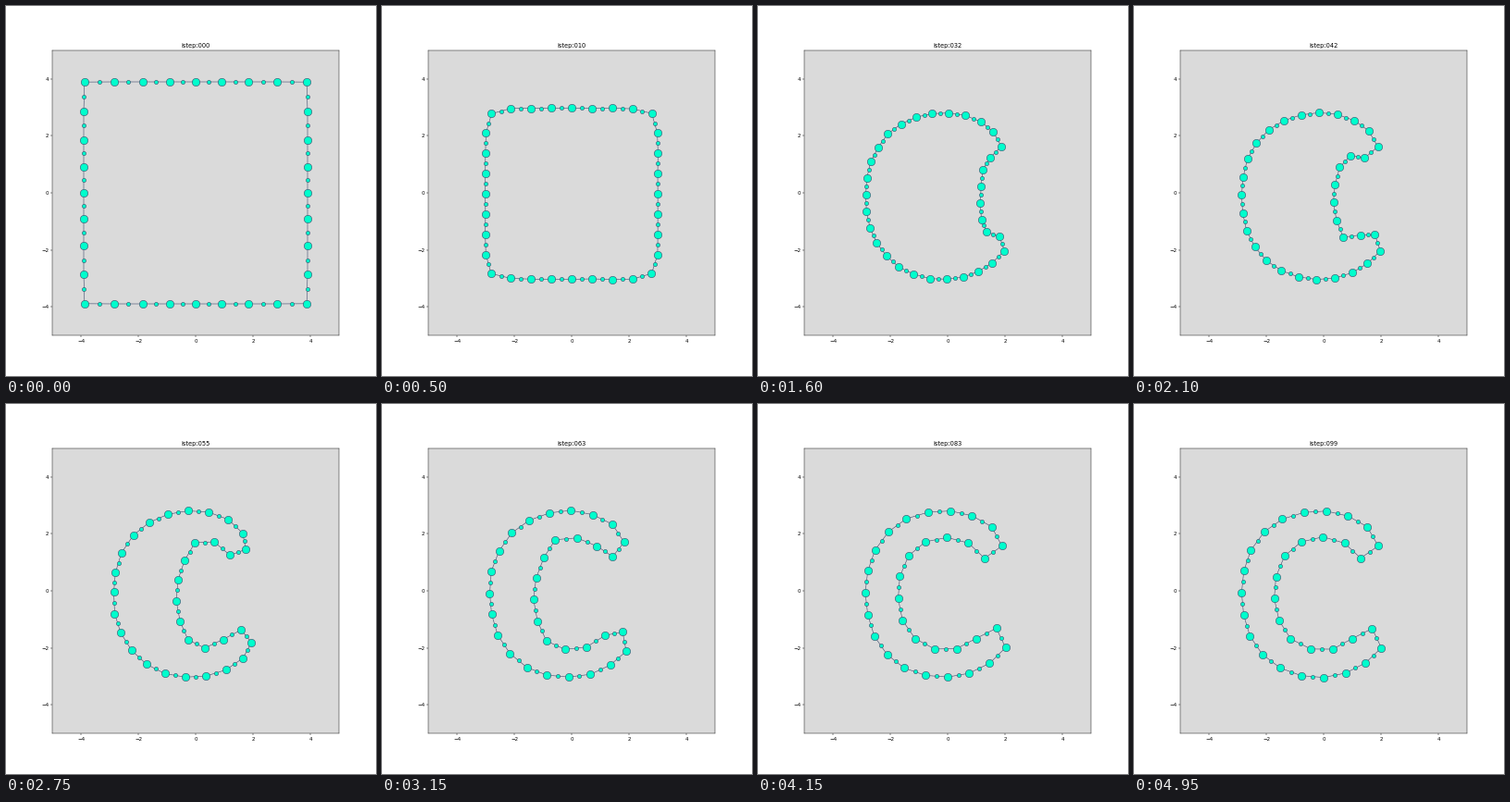
A matplotlib script that plays this animation: 400x400 px, repeating every 5 s.

```python
import numpy as np
import matplotlib.pyplot as plt
from matplotlib.animation import FuncAnimation

FRAMES, INTERVAL = 100, 50
NODES = 32
MEET = 22          # step at which the square has settled on the outer arc
FILL, INK = "#00ffcc", "#3a4468"


def bow(cx, cy, rx, ry, start, end):
    """Arc with a slightly squarer left half; angle 0 is left, pi/2 is up."""
    phi = np.linspace(start, end, 240)
    c, s = np.cos(phi), np.sin(phi)
    e = np.where(c > 0, 2 / 2.2, 1)
    return np.column_stack([cx - rx * np.sign(c) * np.abs(c) ** e,
                            cy - ry * np.sign(s) * np.abs(s) ** e])


# The C, laid out in stage pixels with y pointing down.
OUTER = (202, 205.5, 85.7, 90)
ANCHOR = 0.01
UPPER = np.vstack([bow(*OUTER, ANCHOR, 2.2), (264, 153.5)])
LOWER = np.vstack([(267.5, 263.5), bow(*OUTER, -2.32, ANCHOR)])
INNER = np.vstack([bow(204, 205, 52.5, 61, 2.48, -2.26), (258, 242)])
BARRIER = np.vstack([LOWER, UPPER])


def shrinking_square(t):
    """A square closing in at constant speed until the outer arc stops it."""
    cx, cy = 205, 202 + 2.2 * t / MEET
    phi = np.linspace(0, 2 * np.pi, 721)
    c, s = np.cos(phi), np.sin(phi)
    half = 121 - 2.79 * t
    p = 8 + 300 * np.exp(-t / 2)
    square = half / (np.abs(c) ** p + np.abs(s * 121 / 120) ** p) ** (1 / p)

    dx, dy = cx - BARRIER[:, 0], cy - BARRIER[:, 1]
    stop = np.interp(np.arctan2(s, c), np.arctan2(dy, dx), np.hypot(dx, dy),
                     left=0, right=0)
    r = np.maximum(square, stop)
    return np.column_stack([cx - r * c, cy - r * s])


def closing_c(t):
    """A bowed front moves in through the mouth up to the inner arc."""
    age = t - MEET
    x, y = INNER.T
    reach = 37 + 23 * (age / 35) ** 2
    y = np.clip(y, 206 - reach, 206 + reach)
    bend = 0.006 * min(age / 20, 1)
    front = 264.5 - 2.45 * age + bend * (y - 208) ** 2
    return np.vstack([UPPER, np.column_stack([np.maximum(x, front), y]),
                      LOWER])


def along(points, fractions):
    """Points at the given fractions of a polyline's length."""
    steps = np.hypot(*np.diff(points, axis=0).T)
    length = np.r_[0, np.cumsum(steps)]
    s = fractions * length[-1]
    return np.column_stack([np.interp(s, length, c) for c in points.T])


def contour(t):
    """Closed chain of nodes in data coordinates."""
    outline = shrinking_square(t) if t <= MEET else closing_c(t)
    # At first the nodes crowd towards the middle of each side.
    crowd = 0.07 * np.exp(-t / 2)
    gaps = 1 - crowd * np.cos(np.pi / 4 * (np.arange(NODES) + 0.5))
    nodes = along(outline, np.r_[0, np.cumsum(gaps)[:-1]] / gaps.sum())
    if t:
        nodes += np.random.default_rng(t).normal(0, 0.25, nodes.shape)
    nodes = np.vstack([nodes, nodes[:1]])
    return (nodes[:, 0] - 205) / 31, (202 - nodes[:, 1]) / 30.8


fig = plt.figure(figsize=(10, 10), dpi=40, facecolor="white")
ax = fig.add_subplot()
ax.set_facecolor("#dadada")
ax.set_xlim(-5, 5)
ax.set_ylim(-5, 5)
ax.set_xticks(range(-4, 5, 2))
ax.set_yticks(range(-4, 5, 2))
title = ax.set_title("istep:000")

line, = ax.plot([], [], color=INK, lw=1)
dot_style = dict(ls="", marker="o", mfc=FILL, mec=INK, mew=1)
small, = ax.plot([], [], ms=7.5, **dot_style)
big, = ax.plot([], [], ms=15, **dot_style)


def update(t):
    x, y = contour(t)
    line.set_data(x, y)
    big.set_data(x[:-1], y[:-1])
    small.set_data((x[:-1] + x[1:]) / 2, (y[:-1] + y[1:]) / 2)
    title.set_text(f"istep:{t:03d}")
    return line, small, big, title


anim = FuncAnimation(fig, update, frames=FRAMES, interval=INTERVAL,
                     repeat=True, repeat_delay=0)
plt.show()
```
